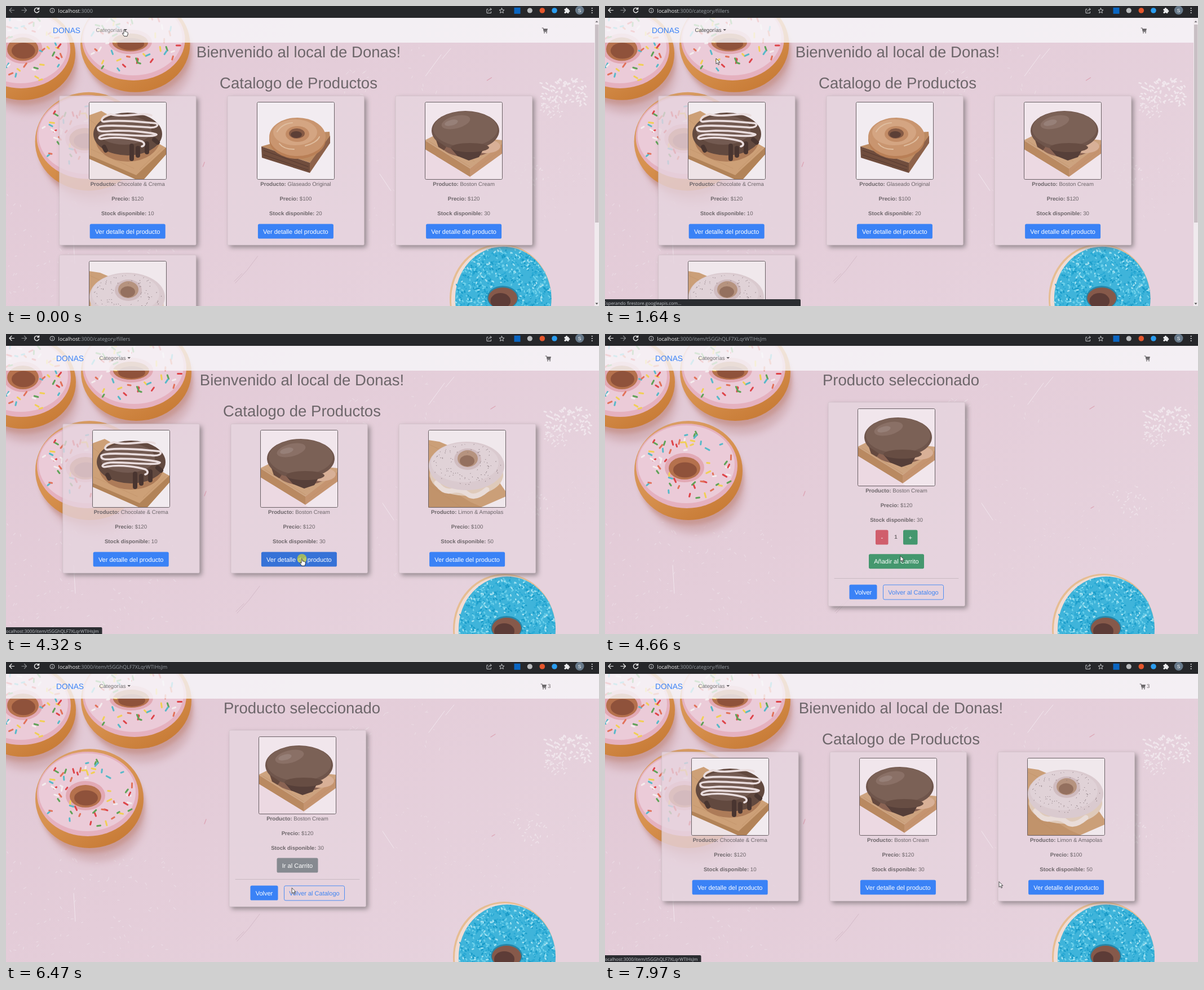
Write an HTML page that moves like this. It is 1052 px wide and 532 px high and loops after 8000 ms.

```html
<!DOCTYPE html>
<html lang="es">
<head>
<meta charset="utf-8">
<title>Donas</title>
<style>
  html, body { margin: 0; width: 100%; height: 100%; overflow: hidden; background: #e4ceda; }
  svg { display: block; }
  text { font-family: "Liberation Sans", Arial, sans-serif; font-size: 9.65px; fill: #6d666a; text-rendering: geometricPrecision; white-space: pre; }
  .ui { font-family: "Open Sans", "Noto Sans", sans-serif; }
  .mid { text-anchor: middle; }
  .h { font-size: 27.5px; text-anchor: middle; }
  .b { font-weight: bold; }
  .btn { font-size: 11px; text-anchor: middle; fill: #fff; }
</style>
</head>
<body>
<svg id="stage" width="1052" height="532" viewBox="0 0 1052 532"></svg>
<script>
const LOOP = 8000, ITEM = '/item/t5GGhQLF7XLqrWTIHsJm', CATEGORY = '/category/fillers';

let seed = 7;
const rnd = () => {
  seed = (seed * 1664525 + 1013904223) >>> 0;
  return seed / 4294967296;
};
const span = (a, b) => a + (b - a) * rnd();
const many = (n, make) => Array.from({ length: n }, (_, i) => make(i)).join('');

// Drawing helpers
const ell = (x, y, rx, ry, fill, extra = '') =>
  `<ellipse cx="${x}" cy="${y}" rx="${rx}" ry="${ry}" fill="${fill}" ${extra}/>`;
const box = (x, y, w, h, fill, extra = '') =>
  `<rect x="${x}" y="${y}" width="${w}" height="${h}" fill="${fill}" ${extra}/>`;
const poly = (points, fill) => `<polygon points="${points}" fill="${fill}"/>`;
const line = (d, stroke, w = 1.2, extra = '') =>
  `<path d="${d}" fill="none" stroke="${stroke}" stroke-width="${w}" stroke-linecap="round" stroke-linejoin="round" ${extra}/>`;
const text = (x, y, s, cls = '', extra = '') => `<text x="${x}" y="${y}" class="${cls}" ${extra}>${s}</text>`;
const group = (id, body, extra = '') => `<g id="${id}" ${extra}>${body}</g>`;

// Random point in a ring between hole and rim
const ringPoint = (x, y, rx, ry, inner) => {
  const a = span(0, Math.PI * 2), r = Math.sqrt(span(inner * inner, 1));
  return [x + rx * r * Math.cos(a), y + ry * r * Math.sin(a)];
};
const dots = (n, x, y, rx, ry, inner, size) => many(n, () => {
  const [px, py] = ringPoint(x, y, rx, ry, inner);
  return `M${px.toFixed(1)} ${py.toFixed(1)}l${span(-size, size).toFixed(1)} ${span(-size, size).toFixed(1)}`;
});

const SPRINKLES = ['#de4449', '#5fa357', '#f1cf55', '#57b9c9', '#f4ecee', '#e2725a'];
function sprinkles(n, x, y, rx, ry, inner) {
  return many(n, i => {
    const [px, py] = ringPoint(x, y, rx, ry, inner), a = span(0, 6.3), l = span(4, 8);
    return line(`M${px.toFixed(1)} ${py.toFixed(1)}l${(l * Math.cos(a)).toFixed(1)} ${(l * Math.sin(a)).toFixed(1)}`,
      SPRINKLES[i % SPRINKLES.length], 3);
  });
}
const donutShadow = (x, y, rx, ry) =>
  ell(x + 12, y + 30, rx - 8, ry - 6, '#cfa9ae', 'opacity=".8" filter="url(#soft)"') +
  ell(x + 4, y + 11, rx - 2, ry - 2, '#c6928a', 'opacity=".75" filter="url(#near)"');
function donut(x, y, rx, ry, hx, hy, hrx, hry) {
  const ix = x - 3, iy = y - 8, irx = rx - 6, iry = ry - 13;
  return ell(x, y, rx, ry, 'url(#dough)') +
    ell(ix, iy, irx, iry, '#e5b1bf') +
    ell(ix - 1, iy - 3, irx - 4, iry - 6, '#ebcbd8') +
    ell(hx, hy, hrx + 7, hry + 6, '#e2a9b4') +
    ell(hx, hy + 1, hrx, hry, '#b5714d') +
    ell(hx + 1, hy + 4, hrx * .75, hry * .68, '#8f523b') +
    sprinkles(62, ix, iy, irx - 9, iry - 9, .42);
}

function backdrop() {
  const flecks = (n, x, y, w, h, size) => many(n, () =>
    `M${span(x, x + w).toFixed(1)} ${span(y, y + h).toFixed(1)}l${span(-size, size).toFixed(1)} ${span(-size, size).toFixed(1)}`);
  const glaze = [['#189bc8', 300], ['#6dd0ea', 340], ['#2aaad5', 240], ['#a4e1f0', 110]];
  const donuts = [
    [30, 85, 94, 83, 30, 76, 28, 21],
    [231, 68, 98, 86, 222, 64, 32, 16],
    [148, 242, 96, 88, 141, 237, 28, 20]
  ];
  return box(0, 0, 1060, 540, 'url(#wall)') +
    line(flecks(110, 0, 330, 300, 190, 4), '#eadbe4', 1.2) +
    line(flecks(110, 620, 260, 420, 170, 3), '#ecdde5', 1) +
    line(flecks(80, 958, 130, 80, 48, 3.5), '#f1e7ed', 2.6) +
    line(flecks(40, 955, 165, 40, 35, 2.5), '#efe3ea', 1.8) +
    line(flecks(30, 900, 270, 65, 60, 3), '#eee2e9', 1.6) +
    line(flecks(28, 600, 75, 170, 90, 5), '#ecdfe6', 1) +
    line('M410 495L431 472L450 447M408 492L422 478', '#d3bac7', 1) +
    line('M750 125l28 -38M668 300l20 30M120 410l3 50M795 76l-15 18', '#f1e6ed', 1) +
    line('M860 133l8 -5M352 287l3 -8M862 309l5 -3', '#dda5b5', 1.4) +
    donuts.map(([x, y, rx, ry]) => donutShadow(x, y, rx, ry)).join('') +
    donuts.map(d => donut(...d)).join('') +
    ell(884, 523, 91, 98, '#e6bd92') + ell(885, 525, 89, 97, '#f0dcd5') +
    ell(889, 523, 86, 93, '#3fb4da') +
    glaze.map(([c, n]) => line(dots(n, 889, 523, 85, 92, .3, 2.4), c, 2.4)).join('') +
    ell(888, 521, 28, 21, '#2587aa') + ell(888, 522, 26, 19, '#86594a') + ell(884, 527, 18, 14, '#5d3c37');
}

// Product pictures on a 138 px square
const picture = (id, bg, body) =>
  `<symbol id="${id}" viewBox="0 0 138 138">${box(0, 0, 138, 138, bg)}${body}</symbol>`;
const boardGrain = (d) => line(d, '#b98b63', .8, 'opacity=".6"');

const pictures =
  picture('crema', '#f1ebef',
    poly('0,24 22,16 138,82 138,92 97,138 84,138 0,94', '#cda077') +
    poly('0,94 84,130 138,80 138,92 97,138 84,138 0,101', '#b28358') +
    poly('0,101 84,138 0,138', '#eee3e6') + boardGrain('M2 32L30 55M4 84L80 118M90 120L130 82') +
    ell(69, 66, 57, 40, '#ad7b58') + ell(69, 57, 61, 38, '#62493f') +
    ell(63, 50, 48, 26, '#735a51') +
    line('M76 78V101M87 82V95M103 74V89M27 80L30 86M116 67L122 72', '#493530', 8) +
    line('M38 22C65 29 98 17 111 24M38 22C20 27 20 36 28 35C55 31 98 36 119 38C126 42 118 47 104 45C70 43 20 39 16 46C15 55 28 52 50 51C78 51 116 55 120 58C116 64 62 57 32 58C14 60 15 68 27 65C52 61 81 66 94 70C101 74 98 78 94 79', '#e9dcdd', 3.6)) +
  picture('glaseado', '#f2ecf1',
    poly('8,79 92,55 129,53 130,66 94,108', '#bd8b62') +
    poly('8,79 94,108 94,126 9,99', '#704d3d') + poly('94,108 130,60 130,73 94,126', '#8e624a') +
    line('M12 86L91 115M12 94L91 121', '#553a31', 1) + boardGrain('M20 82L95 104M103 94L126 64') +
    ell(72, 67, 50, 34, '#b97f56') + ell(72, 62, 50, 34, '#c9956f') +
    ell(68, 54, 39, 23, '#d4a582') + ell(72, 57, 21, 14, '#c28b65') +
    ell(71, 56, 14, 9, '#855a45') + ell(70, 58, 10, 6, '#5c3f36') +
    line('M36 53C42 43 52 38 63 37M86 78C98 75 108 69 111 62M40 74C46 82 57 84 66 84', '#dfbd9f', 2)) +
  picture('boston', '#f1e6ec',
    poly('0,68 24,56 138,68 138,76 80,118', '#cda37f') +
    poly('0,68 80,118 80,133 0,84', '#b98961') + poly('80,118 138,74 138,91 80,133', '#c59470') +
    poly('0,84 80,133 86,138 0,138', '#ecd9e2') + boardGrain('M8 70L80 115M24 66L88 106M86 122L134 86') +
    ell(76, 74, 48, 24, '#8a6353') + ell(108, 79, 26, 12, '#d8b097') +
    poly('46,82 76,86 104,84 96,98 78,104 58,96', '#563f39') +
    ell(72, 51, 60, 35, '#6f554b') + ell(72, 48, 57, 31, '#7b6156') +
    ell(80, 81, 34, 8, '#674d43') + poly('20,68 38,80 34,86 24,80', '#65493f') +
    ell(55, 36, 26, 11, '#8a7066', 'transform="rotate(-14 55 36)"') +
    ell(47, 37, 12, 5, '#978078', 'transform="rotate(-14 47 37)"')) +
  picture('limon', '#f0e8ec',
    poly('0,18 20,21 100,55 138,110 138,118 92,138 0,138', '#cb9f78') +
    poly('0,82 75,128 98,138 0,138', '#c1936b') + boardGrain('M2 98L60 138M2 26L25 37') +
    ell(68, 80, 65, 37, '#dfcaba') + line('M15 94Q27 112 42 108T70 114T104 106', '#e9dcd8', 9) +
    ell(68, 64, 67, 43, '#dacacf') + ell(65, 58, 60, 35, '#e0d2d7') +
    ell(70, 52, 24, 19, '#d0bcc0') + ell(70, 51, 18, 15, '#b6937f') + ell(69, 55, 13, 10, '#94705f') +
    line(dots(95, 68, 61, 61, 37, .4, .5), '#7c6c72', 1));

// Page parts
const button = (x, y, w, label, fill, id = '') =>
  box(x, y, w, 26, fill, `rx="2.6" ${id && `id="${id}"`}`) + text(x + w / 2, y + 17, label, 'btn');
const pic = (id, x, y) => `<use href="#${id}" x="${x}" y="${y}" width="138" height="138"/>` +
  box(x + .5, y + .5, 137, 137, 'none', 'rx="2" stroke="#6a6065"');
const shell = (x, y, w, h) => box(x, y, w, h, '#777073', 'rx="2" opacity=".75" filter="url(#shade)"') +
  box(x, y, w, h, '#e7d5df', 'rx="2" fill-opacity=".8" stroke="#cbbcc3" stroke-opacity=".7" stroke-width=".8"');
const facts = (cx, y, [, name, price, stock]) =>
  [['Producto', name], ['Precio', '$' + price], ['Stock disponible', stock]].map(([k, v], i) =>
    text(cx, y + 26 * i, `<tspan class="b">${k}:</tspan> ${v}`, 'mid')).join('');

const CREMA = ['crema', 'Chocolate &amp; Crema', 120, 10];
const GLASEADO = ['glaseado', 'Glaseado Original', 100, 20];
const BOSTON = ['boston', 'Boston Cream', 120, 30];
const LIMON = ['limon', 'Limon &amp; Amapolas', 100, 50];

function productCard(p, i, hoverId) {
  const x = 100.7 + 298.2 * (i % 3), y = 159.5 + 282 * Math.floor(i / 3), cx = x + 121;
  return shell(x, y, 242.5, 264.5) + pic(p[0], Math.round(cx - 69), Math.floor(y + 11)) + facts(cx, y + 159.5, p) +
    button(cx - 67, y + 227, 134, 'Ver detalle del producto', '#3a82f6', hoverId);
}
const titles = text(525, 91, 'Bienvenido al local de Donas!', 'h') + text(525, 146, 'Catalogo de Productos', 'h');
const catalog = (list, hoverId) => titles + list.map((p, i) => productCard(p, i, p === BOSTON ? hoverId : '')).join('');

const footer = (y, backId) => line(`M407 ${y}H627`, '#c9b9c1', 1) +
  button(433.5, y + 11.2, 49, 'Volver', '#3a82f6', backId) +
  box(493.5, y + 11.5, 107, 26, 'none', 'rx="2.6" stroke="#4c8df3"') +
  text(547, y + 28.2, 'Volver al Catalogo', 'btn', 'style="fill:#3f84f2"');

const itemPage = text(525, 91, 'Producto seleccionado', 'h') +
  group('buying', shell(396, 121, 242.5, 361.5) +
    button(480, 347.5, 22.5, '-', '#d05e6c') +
    text(516, 363, '1', 'mid b', 'id="count"') +
    box(527.5, 346, 28, 29, '#9fb8ab', 'rx="4" id="ring"') +
    button(529, 347.5, 25.5, '+', '#44976e', 'plus') +
    button(468, 390.2, 98, 'Añadir al Carrito', '#44976e', 'add') +
    footer(433.4)) +
  group('bought', shell(396, 121, 242.5, 313) +
    button(480.5, 347.5, 73, 'Ir al Carrito', '#868a90') +
    footer(385.4, 'back')) +
  pic('boston', 448, 132) + facts(517, 280.5, BOSTON);

const cart = group('cart', line('M0 0H2L3.4 6.4H8.8', '#676467', 1.1) + poly('2.2,1.2 10,1.2 8.8,5.4 3.2,5.4', '#676467') +
  ell(4, 8.6, 1, 1, '#676467') + ell(8, 8.6, 1, 1, '#676467'));
const menu = group('menu', box(165.5, 58, 110, 80, '#fbf8fa', 'rx="2.5" stroke="#cfc6cb"') +
  box(166, 63, 109, 23, '#ebe5e9', 'id="pick"') +
  ['Rellenas', 'Clasicas', 'Especiales'].map((s, i) => text(176, 78 + 23 * i, s)).join(''));
const navbar = text(89, 47.5, 'DONAS', '', 'style="font-size:13.8px;fill:#3a82f6"') +
  text(165.5, 46, 'Categorías', '', 'id="cat"') + poly('215.5,41 221,41 218.2,44', '#59565a') +
  cart + text(961, 46.3, '3', '', 'id="cartCount"') + menu;

const scrollbar = group('scroll', box(1044, 21, 8, 511, '#f0eaee') + box(1045, 33, 6.5, 351, '#c8bfc4') +
  poly('1045.5,29 1050.5,29 1048,26', '#78747a') + poly('1045.5,526.5 1050.5,526.5 1048,529.5', '#505050'));

const gray = '#c6c8cb';
const toolbar = box(0, 0, 1052, 21, '#26272a') +
  line('M14.5 7.5H6M10 3.5L6 7.5L10 11.5', '#f1f1f1', 1.2, 'id="goBack"') +
  line('M28 7.5H36.5M32.5 3.5L36.5 7.5L32.5 11.5', '#f1f1f1', 1.2, 'id="goNext"') +
  line('M58 5A4.2 4.2 0 1 0 58.6 9M58.6 3V5.8H55.7', '#f1f1f1', 1.4) +
  line('M82 7.6V10.2M82 5.7V5.8', gray, 1) + ell(82, 8, 4, 4, 'none', `stroke="${gray}"`) +
  `<text x="92.6" y="11.5" class="ui" style="font-size:9.12px;fill:#f2f2f2">localhost<tspan id="path" fill="#9aa0a6"></tspan></text>` +
  line('M855 5.5H853V12.5H860.5V10M856 9.5C856 6.8 858 5.8 861 5.8M859 3.8L861.3 5.8L859 7.8', gray, 1) +
  line('M879.5 3.8L880.8 6.9L884 7.1L881.5 9.2L882.3 12.4L879.5 10.7L876.7 12.4L877.5 9.2L875 7.1L878.2 6.9Z', gray, 1) +
  box(901.5, 2.8, 11, 11, '#0a66c2') + ell(929.3, 8, 4.6, 4.6, '#b9bbbd') +
  ell(951.3, 8, 4.8, 4.8, '#e5562c') + ell(973, 8, 4.8, 4.8, '#2a9df0') +
  box(990.5, 5, 8, 8, '#e9eaec', 'rx="1"') + ell(994.5, 4.8, 1.7, 1.7, '#e9eaec') + ell(998.7, 9, 1.7, 1.7, '#e9eaec') +
  ell(990.7, 9, 1.3, 1.3, '#26272a') + ell(994.5, 13, 1.3, 1.3, '#26272a') +
  ell(1017.7, 7.5, 7.8, 7.8, '#67798a') + text(1017.7, 10.6, 'S', 'mid', 'style="fill:#fff;font-size:8.5px"') +
  [4, 8, 12].map(y => ell(1039.7, y, 1.1, 1.1, '#d8d9db')).join('');

const status = group('status', box(-4, 520, 10, 16, '#2b2d31', 'rx="2" id="statusBox"') +
  text(-2.3, 529.8, '', 'ui', 'id="statusText" style="font-size:7.86px;fill:#c3c6ca"'));

const cursor = ell(0, 0, 8.5, 8.5, '#d3d82e', 'id="click" opacity=".68"') +
  group('arrow', '<path d="M0 0V9.8L2.4 7.7L4 11.3L5.6 10.6L4 7.1H7Z" fill="#fff" stroke="#222" stroke-width=".8"/>') +
  group('hand', '<path d="M-1 1Q0 -.6 1 1V4.5Q2 3.6 2.9 4.9Q4 4.2 4.7 5.5Q6 5 6.2 6.6V9L5 12.6H-.4L-3.4 8Q-3.7 6.5 -2.4 6.9L-1 8Z" fill="#fff" stroke="#222" stroke-width=".85"/>');

document.getElementById('stage').innerHTML = `<defs>
  <filter id="soft" x="-30%" y="-30%" width="160%" height="160%"><feGaussianBlur stdDeviation="7"/></filter>
  <filter id="near" x="-20%" y="-20%" width="140%" height="140%"><feGaussianBlur stdDeviation="3.5"/></filter>
  <filter id="shade" x="-10%" y="-10%" width="120%" height="120%">
    <feOffset dx="4" dy="4"/><feGaussianBlur stdDeviation="4.3"/><feComposite operator="out" in2="SourceAlpha"/>
  </filter>
  <linearGradient id="wall" x2="1" y2=".6"><stop stop-color="#e1c8d5"/><stop offset=".5" stop-color="#e4cdd9"/><stop offset="1" stop-color="#e6d2dd"/></linearGradient>
  <linearGradient id="dough" x2=".6" y2="1"><stop stop-color="#dba26c"/><stop offset=".6" stop-color="#d7914f"/><stop offset="1" stop-color="#c97d38"/></linearGradient>
  ${pictures}</defs>` +
  group('back-wall', backdrop()) + box(0, 21, 1052, 44, '#f8f8fa', 'fill-opacity=".8"') +
  group('page', group('all', catalog([CREMA, GLASEADO, BOSTON, LIMON], 'bostonAll')) +
    group('filtered', catalog([CREMA, BOSTON, LIMON], 'bostonBtn')) + group('item', itemPage) + navbar) +
  scrollbar + toolbar + status + group('pointer', cursor);

// Motion
const $ = id => document.getElementById(id);
const show = (id, on) => $(id).setAttribute('display', on ? 'inline' : 'none');
const fill = (id, c) => { $(id).style.fill = c; };
const within = (t, ...ranges) => ranges.some(([a, b]) => t >= a && t < b);

const MOVES = [
  [0, 210, 41], [210, 210, 41], [630, 191, 66], [900, 191, 66], [970, 193, 69], [1170, 193, 69],
  [1600, 197, 93], [1970, 197, 93], [2370, 325, 250], [2510, 325, 250], [2900, 526, 411.5],
  [3200, 525, 398.5], [4390, 525, 398.5], [5070, 522, 384], [5140, 522, 384], [5450, 535, 366.5],
  [5910, 535, 366.5], [6180, 514, 400], [6400, 514, 400], [6720, 460, 405], [7640, 460, 405],
  [7800, 570, 364], [7970, 699, 389.5], [8000, 699, 389.5]
];
function pointerAt(t) {
  const i = MOVES.findIndex(m => m[0] > t), a = MOVES[i - 1], b = MOVES[i];
  const k = (t - a[0]) / (b[0] - a[0]), e = k * k * (3 - 2 * k);
  return [a[1] + (b[1] - a[1]) * e, a[2] + (b[2] - a[2]) * e];
}

function draw(t) {
  const all = t < 3100, item = within(t, [4460, 7300]), bought = t >= 6330;
  show('all', all);
  show('filtered', !all && !item);
  show('item', item);
  show('scroll', all);
  $('page').setAttribute('transform', `translate(${all ? -6 : 0} 0)`);
  $('back-wall').setAttribute('transform', `scale(${all ? 1044 / 1052 : 1})`);

  $('path').textContent = ':3000' + (t < 720 ? '' : item ? ITEM : CATEGORY);
  $('goBack').setAttribute('stroke', t < 720 ? '#85878a' : '#f1f1f1');
  $('goNext').setAttribute('stroke', t < 7300 ? '#85878a' : '#f1f1f1');

  show('menu', within(t, [140, 720]));
  show('pick', within(t, [480, 720]));
  fill('cat', t < 140 ? '#858184' : t < 2440 ? '#4b484b' : '#737073');

  show('buying', !bought);
  show('bought', bought);
  $('count').textContent = t < 5560 ? 1 : t < 5800 ? 2 : 3;
  show('ring', within(t, [5450, 6250]));
  fill('plus', within(t, [5400, 5980]) ? '#3c8763' : '#44976e');
  fill('add', within(t, [6110, 6330]) ? '#3c8763' : '#44976e');
  fill('back', t >= 6650 ? '#3672d7' : '#3a82f6');
  fill('bostonBtn', within(t, [3100, 4460], [7300, 7740]) ? '#3672d7' : '#3a82f6');
  show('cartCount', bought);
  $('cart').setAttribute('transform', `translate(${bought ? 949 : 957} 39)`);

  const waiting = within(t, [1450, 2200]), link = within(t, [3170, 4600]) || t >= 7640;
  show('status', waiting || link);
  $('statusBox').setAttribute('width', waiting ? 351 : 174.5);
  $('statusText').textContent = waiting ? 'Esperando firestore.googleapis.com...' : 'localhost:3000' + ITEM;

  const [x, y] = pointerAt(t);
  const hand = within(t, [0, 300], [480, 720], [2860, 4460], [5350, 6350], [6640, 7740]);
  $('pointer').setAttribute('transform', `translate(${x.toFixed(2)} ${y.toFixed(2)})`);
  show('hand', hand);
  show('arrow', !hand);
  show('click', within(t, [140, 280], [640, 780], [4320, 4530], [5520, 5660], [5750, 5890], [6260, 6400], [7160, 7370]));
}

const start = performance.now();
function tick() {
  draw((performance.now() - start) % LOOP);
  requestAnimationFrame(tick);
}
draw(0);
requestAnimationFrame(tick);
</script>
</body>
</html>
```
